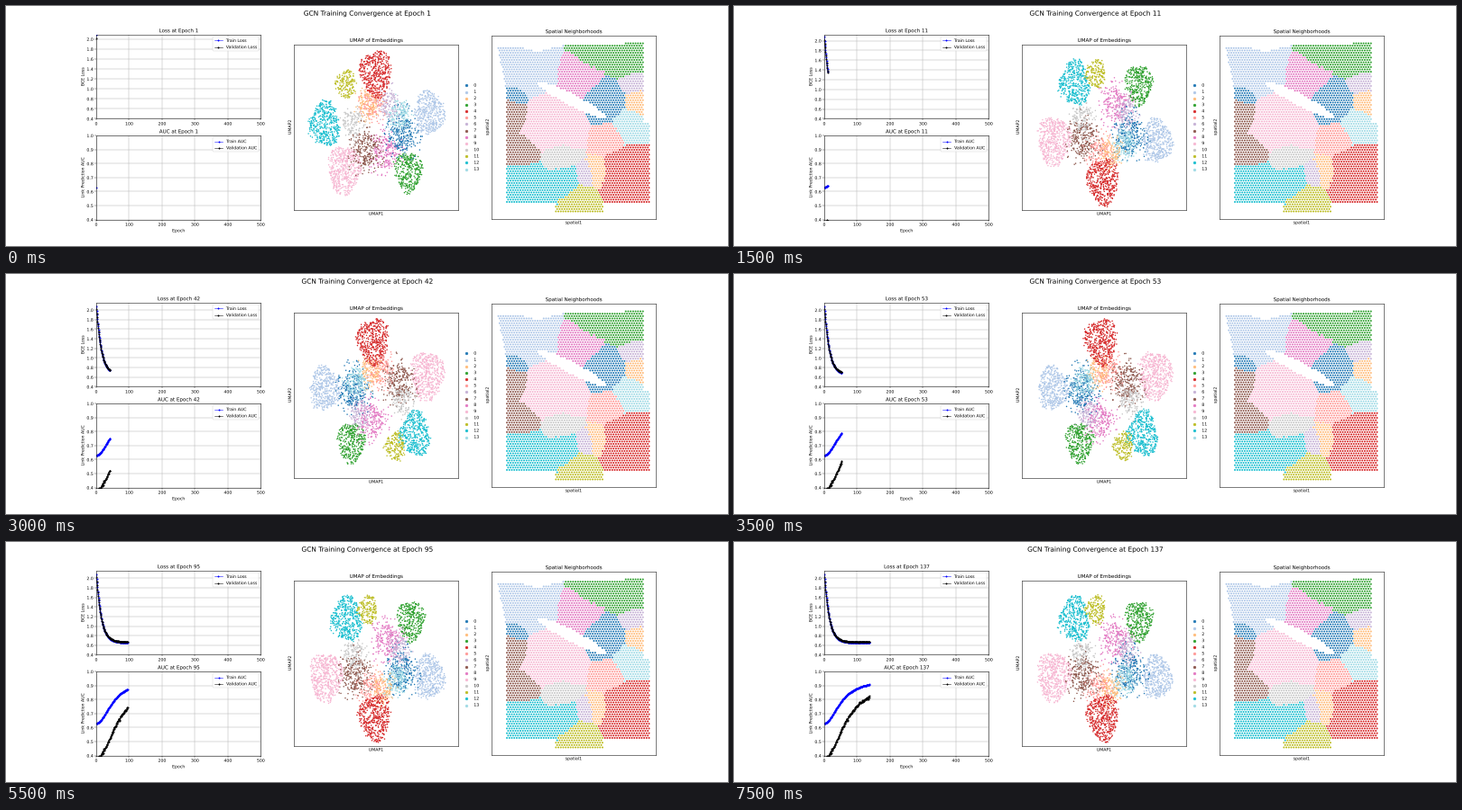
These frames come from a looping animation (800x267 px, 8000 ms). A matplotlib script:

```python
import numpy as np
import matplotlib.pyplot as plt
from matplotlib.animation import FuncAnimation
from matplotlib.patheffects import Normal
from matplotlib.text import Text

plt.rcParams.update({
    "font.family": "DejaVu Sans", "text.hinting": "none",
    "axes.linewidth": 1.1, "grid.linewidth": 1.0,
})

CLUSTERS = 14
COLORS = plt.cm.tab20(np.linspace(0, 1, CLUSTERS))
EPOCHS = [1, 2, 3] + [int(np.ceil(10.5 * k)) for k in range(1, 14)]
rng = np.random.default_rng(4)


# ---- training curves -------------------------------------------------
def rise(start, gain, half):
    """Sigmoid growth that reaches half its gain at epoch `half`."""
    return start + gain * epoch**2 / (epoch**2 + half**2)


def noisy(curve, amount):
    return curve + rng.normal(0, amount, curve.size)


epoch = np.arange(1, EPOCHS[-1] + 1)
decay = np.exp(-(epoch - 1) / 14.2)
curves = [noisy(0.655 + 1.43 * decay, 0.003),
          noisy(0.668 + 1.36 * decay, 0.004),
          noisy(rise(0.63, 0.32, 53), 0.0015),
          noisy(rise(0.38, 0.55, 68.7), 0.006)]

# ---- tissue spots, in stage pixels -----------------------------------
# discs (x, y, radius) that claim the spots nearest to their rim
REGIONS = {
    0: [(662, 108, 20), (566, 97, 9)], 1: [(580, 70, 28)],
    2: [(700, 108, 11), (657, 185, 10)], 3: [(650, 52, 14), (688, 57, 18)],
    4: [(690, 188, 28)], 5: [(667, 147, 14)],
    6: [(695, 85, 10), (641, 188, 8)], 7: [(561, 122, 14), (575, 163, 16)],
    8: [(633, 80, 19)], 9: [(607, 133, 32)], 10: [(612, 165, 18)],
    11: [(636, 217, 13)], 12: [(580, 198, 24), (618, 192, 14)],
    13: [(690, 132, 16)],
}


def on_tissue(x, y):
    left = 545 + 9 * np.clip((y - 45) / 50, 0, 1)
    right = np.where(y > 130, 713.5, 706)
    top = 45 - 4 * (x - 545) / 160 + 6 * np.exp(-((x - 590) / 18) ** 2)
    bottom = np.where(abs(x - 635) < 26, 229.5, 218)
    gap = ((x - 626) / 38) ** 2 + ((y - 78 - 0.5 * (x - 574)) / 7) ** 2
    return (x > left) & (x < right) & (y > top) & (y < bottom) & (gap > 1)


row, col = np.mgrid[0:72, 0:62]
x = (545.5 + (col + 0.5 * (row % 2)) * 167 / 61.5).ravel()
y = (41.5 + row * 187 / 71).ravel()
spots = np.column_stack([x, y])[on_tissue(x, y)]


def rim_distance(discs):
    gaps = [np.hypot(*(spots - (cx, cy)).T) - r for cx, cy, r in discs]
    return np.min(gaps, axis=0) + rng.normal(0, 0.8, len(spots))


label = np.argmin([rim_distance(REGIONS[c]) for c in range(CLUSTERS)], axis=0)

# ---- embedding: each cluster sits at an angle on one of two rings ----
OUTER = [1, 3, 4, 9, 11, 12]
FIRST = {0: 345, 1: 15, 2: 115, 3: 305, 4: 92, 5: 100, 6: 65, 7: 240,
         8: 287, 9: 231, 10: 170, 11: 127, 12: 177, 13: 30}
LATER = {0: 340, 1: 345, 2: 280, 3: 52, 4: 267, 5: 255, 6: 35, 7: 205,
         8: 68, 9: 194, 10: 160, 11: 101, 12: 126, 13: 320}

reach = np.where(np.isin(np.arange(CLUSTERS), OUTER), 59, 28)
size = 1.0 * np.sqrt(np.bincount(label, minlength=CLUSTERS))

# each cell keeps its place inside its own cluster
angle = rng.uniform(0, 2 * np.pi, label.size)
radius = np.sqrt(rng.random(label.size)) * (1 + 0.1 * np.sin(3 * angle + label))
stray = ~np.isin(label, OUTER) & (rng.random(label.size) < 0.35)
radius[stray] *= 1.6
offset = np.column_stack([0.82 * np.cos(angle), 1.2 * np.sin(angle)])
offset *= (radius * size[label])[:, None]


def embed(i):
    """Every step is a fresh embedding: turned or mirrored, never tweened."""
    angles = FIRST if i < 3 else LATER
    spin = 188 if 6 <= i <= 9 else 0
    flip = -1 if i in (1, 2) else 1
    a = np.radians([angles[c] + spin for c in range(CLUSTERS)])
    centre = np.column_stack([412 + reach * np.cos(a),
                              135 - flip * 1.02 * reach * np.sin(a)])
    wobble = np.random.default_rng(i).normal(0, 0.8, offset.shape)
    return centre[label] + offset + wobble


# ---- figure ----------------------------------------------------------
fig = plt.figure(figsize=(24.0001, 8.0101), dpi=100 / 3)
grid = fig.add_gridspec(2, 3)
ax_loss = fig.add_subplot(grid[0, 0])
ax_auc = fig.add_subplot(grid[1, 0])
ax_umap = fig.add_subplot(grid[:, 1])
ax_tissue = fig.add_subplot(grid[:, 2])
heading = fig.suptitle("", fontsize=16)


def curve_panel(ax, name, ylabel, yticks):
    lines = [ax.plot([], [], style, lw=1.1, label=f"{part} {name}")[0]
             for part, style in (("Train", "b.-"), ("Validation", "k.-"))]
    ax.set(xlim=(0, 500), ylim=(0.4, yticks[-1]), yticks=yticks,
           ylabel=ylabel)
    ax.grid(True)
    ax.legend(loc="upper right")
    return lines


def point_panel(ax, points, size, marker, title, axis, xlim, ylim):
    ax.set(xlim=xlim, ylim=ylim, xticks=[], yticks=[], title=title,
           xlabel=f"{axis}1", ylabel=f"{axis}2")
    ax.set_box_aspect((ylim[0] - ylim[1]) / (xlim[1] - xlim[0]))
    return ax.scatter(*points.T, s=size, c=COLORS[label], marker=marker,
                      linewidths=0)


lines = curve_panel(ax_loss, "Loss", "BCE Loss", np.linspace(0.4, 2, 9))
lines += curve_panel(ax_auc, "AUC", "Link Prediction AUC",
                     np.linspace(0.4, 1, 7))
ax_auc.set_xlabel("Epoch")

cells = point_panel(ax_umap, embed(0), 42, ".", "UMAP of Embeddings", "UMAP",
                    (318.8, 501.2), (226.9, 42.7))
point_panel(ax_tissue, spots, 19, "o", "Spatial Neighborhoods", "spatial",
            (537.6, 720), (236.7, 32.9))
for c in range(CLUSTERS):
    ax_umap.scatter([], [], color=COLORS[c], label=str(c))
ax_umap.legend(frameon=False, loc="center left", bbox_to_anchor=(1, 0.5))


def draw(i):
    n = EPOCHS[i]
    for line, curve in zip(lines, curves):
        line.set_data(epoch[:n], curve[:n])
    shown = np.concatenate([curve[:n] for curve in curves[:2]])
    ax_loss.set_ylim(0.4, shown.max() + 0.05 * np.ptp(shown))
    ax_loss.set_title(f"Loss at Epoch {n}")
    ax_auc.set_title(f"AUC at Epoch {n}")
    heading.set_text(f"GCN Training Convergence at Epoch {n}")
    cells.set_offsets(embed(i))
    return []


# outlined glyphs keep even spacing at this small size
draw(0)
fig.canvas.draw()
for text in fig.findobj(Text):
    text.set_path_effects([Normal()])

anim = FuncAnimation(fig, draw, frames=len(EPOCHS), interval=500,
                     repeat=True, repeat_delay=0)
plt.show()
```
